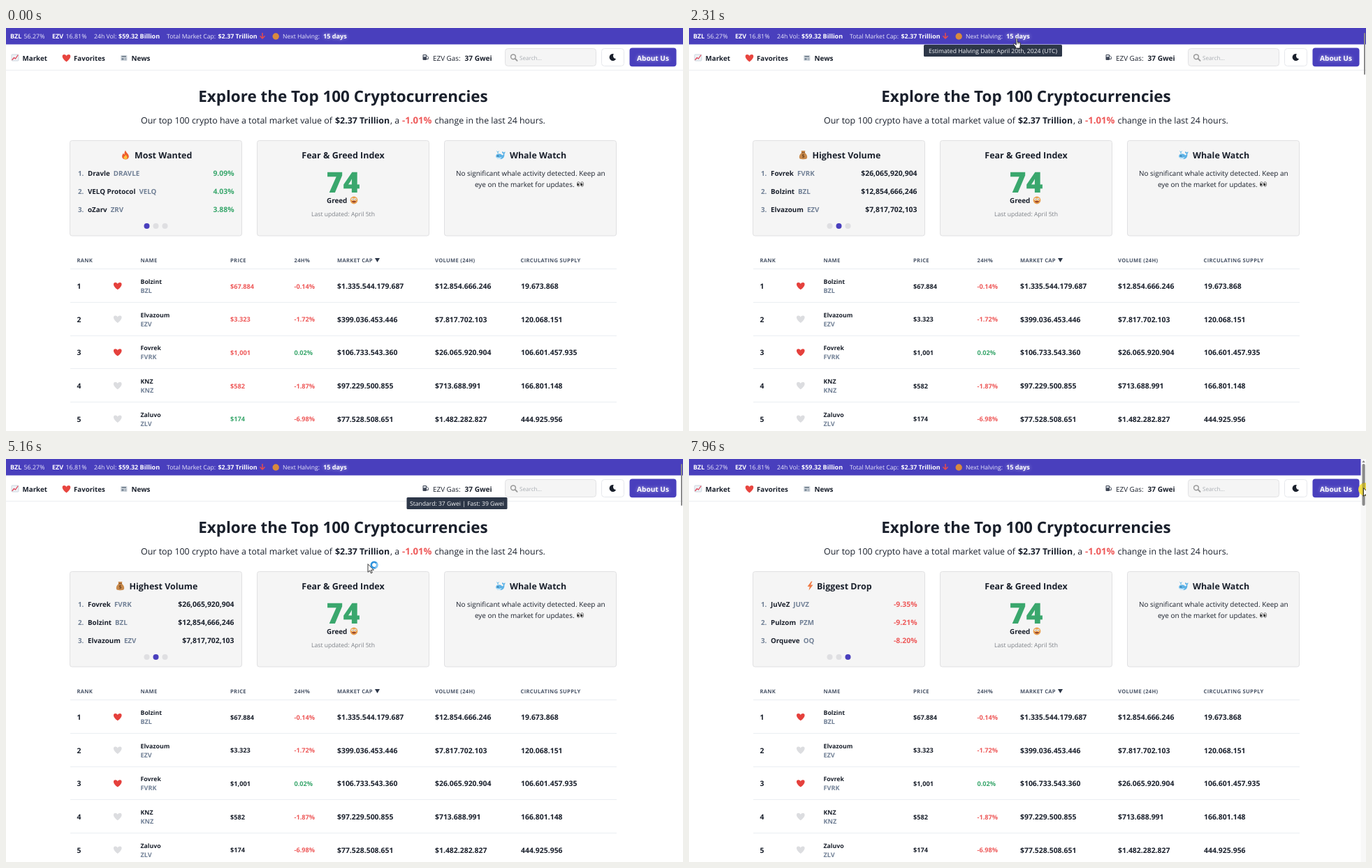
An HTML page for the animation above (8 s loop, 969 by 578 pixels).

```html
<!DOCTYPE html>
<html lang="en">
<head>
<meta charset="utf-8">
<title>Top 100 dashboard</title>
<style>
html, body { margin: 0; width: 100%; height: 100%; overflow: hidden; background: #fff; }
svg { display: block; width: 969px; height: 578px; }
text { font-family: "Open Sans", "Noto Sans", sans-serif; text-rendering: geometricPrecision; white-space: pre; }
.b { font-weight: 700; }
.x { font-weight: 800; }
.glow { text-shadow: 0 0 5px rgba(255, 255, 255, .6); }
</style>
</head>
<body>
<svg id="stage" viewBox="0 0 969 578"></svg>
<script>
const LOOP = 8000;
const INK = '#1a202c', SLATE = '#718096', RED = '#ee5a5a', GREEN = '#3aa76d', BRAND = '#493fbd';
const HEART = 'M0 5.4C-7.7 0-6.6-5-3.3-5-1.4-5 0-3.7 0-2.6 0-3.7 1.4-5 3.3-5 6.6-5 7.7 0 0 5.4Z';

const text = (x, y, size, str, fill = INK, cls = '', anchor = 'start') =>
  `<text x="${x}" y="${y}" font-size="${size}" fill="${fill}" class="${cls}" text-anchor="${anchor}">${str}</text>`;
const rect = (x, y, w, h, fill, r = 0, stroke = 'none') =>
  `<rect x="${x}" y="${y}" width="${w}" height="${h}" rx="${r}" fill="${fill}" stroke="${stroke}"/>`;
const dot = (x, y, r, fill) => `<circle cx="${x}" cy="${y}" r="${r}" fill="${fill}"/>`;
const path = (d, fill, stroke = 'none', w = 1) =>
  `<path d="${d}" fill="${fill}" stroke="${stroke}" stroke-width="${w}" stroke-linejoin="round" stroke-linecap="round"/>`;
const at = (x, y, body, id = '') => `<g ${id && `id="${id}"`} transform="translate(${x} ${y})">${body}</g>`;

const icon = {
  chart: rect(-5, -4.5, 10, 9, '#eef2f6', 1, '#ccd5de') + path('M-4 3L-1.5 0 .5 1.5 4-3.5', 'none', '#e0475b', 1.3),
  news: rect(-4.5, -4, 9.5, 8, '#d5dbe1', 1) + rect(-3, -3, 6.5, 1.6, '#697785') +
    rect(-3, 0, 3, 3, '#7d8b99') + rect(1, 0, 3, 1, '#8895a2') + rect(1, 2, 3, 1, '#8895a2'),
  pump: rect(-4, -4, 5.5, 8, '#3f4756', 1) + rect(-3, -3, 3.5, 2.4, '#dfe4ea') +
    path('M2-2L3.8-.5V2.5H2', 'none', '#3f4756', 1),
  fire: path('M0-6.5C1-3 5-1 4.8 2.4 4.6 5 2.5 6.5 0 6.5-3 6.5-5 4.5-4.8 1.8-4.7 0-3.8-1.2-3-2.4-2.6-1-2-.6-1.4-.6-1.8-3-1-5 0-6.5Z', '#ee5a2c') +
    path('M.4-.5C1 1.4 2.8 2 2.6 4 2.4 5.6 1.2 6.2 0 6.2-1.8 6.2-2.8 5-2.6 3.4-2.4 2 0 1.6.4-.5Z', '#fbc13c'),
  bag: path('M-2-3.5L-3-6H3L2-3.5C5-1 6 1.8 5.6 4 5.3 5.7 4 6.2 0 6.2S-5.3 5.7-5.6 4C-6 1.8-5-1-2-3.5Z', '#c98a4b') +
    rect(-2.6, -4, 5.2, 1.3, '#8d572c', .6) + text(0, 4.2, 7, '$', '#6c4220', 'b', 'middle'),
  bolt: path('M1.5-6.5L-4 1H-.8L-2 6.5 4-1.5H.6L3-6.5Z', '#ef7a45'),
  whale: path('M-6 0C-5-2.2 0-2.6 2.2-.5 3.6.5 4.4-.5 4.4-2.2 2.8-2.4 2.3-4 2.5-5.2 4-5 4.8-4.4 5-3.6 5.4-4.4 6.2-5 7-5 7-3.4 6.4-2.4 5.8-2.1 6.4 3 3.6 5.5-.6 5.5-4.4 5.5-7 3.6-6 0Z', '#5cb2e6') +
    path('M-6 2.5C-3 4 0 3.6 2 2.5 1 5-.6 5.4-2 5.4-4.4 5.2-5.8 4-6 2.5Z', '#d9effb') +
    path('M-3.5-2.6V-4.5M-3.5-4.5L-5-5.8M-3.5-4.5L-2-5.8', 'none', '#6fc0ec', 1) + dot(-3.4, 1, .7, '#1f3d54'),
  face: dot(0, 0, 5.4, '#e9a04f') + dot(-2, -1.5, 1.7, '#fff') + dot(2, -1.5, 1.7, '#fff') +
    dot(-1.8, -1.4, .7, '#443') + dot(2.1, -1.4, .7, '#443') + path('M-3 1.3H3C2.6 4-2.6 4-3 1.3Z', '#8c3b2c'),
  eyes: [-2.6, 2.6].map(x => `<ellipse cx="${x}" cy="0" rx="2" ry="3.4" fill="#fff" stroke="#555" stroke-width=".8"/>` +
    `<ellipse cx="${x - .5}" cy=".4" rx="1.1" ry="1.9" fill="#222"/>`).join(''),
  moon: path('M1.6-4.8A5 5 0 1 0 4.8 2.2 4.2 4.2 0 0 1 1.6-4.8Z', INK),
  lens: '<circle r="3.4" cx="-1" cy="-1" fill="none" stroke="#9a9a9a" stroke-width="1.5"/>' + path('M1.7 1.7L4.6 4.6', 'none', '#9a9a9a', 1.9)
};

function topBar() {
  const w = '#fff', soft = '#e9e7fb';
  return rect(0, 0, 969, 23.5, BRAND) +
    text(6, 15.4, 9, 'BZL', w, 'b') + text(25.5, 15.4, 8.9, '56.27%', soft) +
    text(66, 15.4, 9, 'EZV', w, 'b') + text(85.5, 15.4, 8.9, '16.81%', soft) +
    text(126, 15.4, 8.7, '24h Vol:', soft) + text(161, 15.4, 9, '$59.32 Billion', w, 'b') +
    text(230, 15.4, 8.65, 'Total Market Cap:', soft) + text(303.5, 15.4, 8.9, '$2.37 Trillion', w, 'b') +
    path('M367 7.5V15M363.8 11.8L367 15 370.2 11.8', 'none', '#e84c4c', 1.5) +
    dot(386.2, 12, 4.7, '#d98a3d') +
    text(396, 15.4, 8.6, 'Next Halving:', soft) + text(454, 15.4, 9.1, '15 days', w, 'b glow');
}

function nav() {
  return rect(0, 60, 969, 1, '#eceef1') +
    at(13, 42.5, icon.chart) + text(23.5, 46.5, 9.8, 'Market', INK, 'b') +
    at(86.5, 43, path(HEART, '#e8453f')) + text(97, 46.5, 9.7, 'Favorites', INK, 'b') +
    at(168.5, 43, icon.news) + text(179.5, 46.5, 9.9, 'News', INK, 'b') +
    at(600.5, 42, icon.pump) + text(611, 46.5, 9.9, 'EZV Gas:') + text(656.5, 46.5, 10.1, '37 Gwei', INK, 'b') +
    rect(714.5, 29.5, 130, 25, '#f5f5f5', 4, '#e2e2e4') + at(727, 42.3, icon.lens) +
    text(735, 45.5, 8.1, 'Search...', '#a9adb3') +
    rect(852.5, 29.5, 32, 25, '#fff', 4, '#e6e8ec') + at(868.3, 42, icon.moon) +
    rect(892.5, 28.6, 67, 26.6, BRAND, 4) + text(926, 46.5, 10.1, 'About Us', '#fff', 'b glow', 'middle');
}

function hero() {
  return text(482.5, 106.3, 22.45, 'Explore the Top 100 Cryptocurrencies', INK, 'b', 'middle') +
    text(193, 136.5, 12.45, 'Our top 100 crypto have a total market value of') +
    text(471, 136.5, 12.4, '$2.37 Trillion', INK, 'b') + text(550, 136.5, 12.4, ', a') +
    text(567, 136.5, 13.2, '-1.01%', RED, 'b') + text(613.5, 136.5, 12.35, 'change in the last 24 hours.');
}

// Each slide: title, icon, icon x, title x, value colour, rows
const slides = [
  ['Most Wanted', 'fire', 171, 184, GREEN,
    [['Dravle', 'DRAVLE', '9.09%'], ['VELQ Protocol', 'VELQ', '4.03%'], ['oZarv', 'ZRV', '3.88%']]],
  ['Highest Volume', 'bag', 163.5, 176.5, INK,
    [['Fovrek', 'FVRK', '$26,065,920,904'], ['Bolzint', 'BZL', '$12,854,666,246'], ['Elvazoum', 'EZV', '$7,817,702,103']]],
  ['Biggest Drop', 'bolt', 173.5, 183, RED,
    [['JuVeZ', 'JUVZ', '-9.35%'], ['Pulzom', 'PZM', '-9.21%'], ['Orqueve', 'OQ', '-8.20%']]]
];

function slide([title, pic, ix, tx, color, rows], i) {
  return `<g id="slide${i}">` + at(ix, 182, icon[pic]) + text(tx, 186.6, 12.45, title, INK, 'b') +
    rows.map(([name, code, val], k) => {
      const y = 212 + 26 * k;
      return text(103, y, 9.8, `${k + 1}.`, SLATE, 'b') +
        text(117, y, 9.8, `${name}<tspan dx="5" fill="${SLATE}">${code}</tspan>`, INK, 'b') +
        text(326.5, y, 10.4, val, color, 'b', 'end');
    }).join('') + '</g>';
}

function cards() {
  return [91.5, 359.5, 627.5].map(x => rect(x, 161.5, 246, 136.5, '#f5f5f5', 3, '#e0e0e2')).join('') +
    slides.map(slide).join('') +
    [0, 1, 2].map(i => `<circle id="dot${i}" cx="${201.5 + 13 * i}" cy="284" r="4"/>`).join('') +
    text(482.5, 186.6, 12.5, 'Fear &amp; Greed Index', INK, 'b', 'middle') +
    text(482.5, 236, 41, '74', GREEN, 'x', 'middle') +
    text(459, 251, 9.9, 'Greed', INK, 'b') + at(498, 247, icon.face) +
    text(482.5, 270, 8.6, 'Last updated: April 5th', '#7c8087', '', 'middle') +
    at(707.5, 182.5, icon.whale) + text(721, 186.6, 12.4, 'Whale Watch', INK, 'b') +
    text(750.8, 212, 9.94, 'No significant whale activity detected. Keep an', INK, '', 'middle') +
    text(671, 227.5, 9.94, 'eye on the market for updates.') + at(822, 224, icon.eyes);
}

const coins = [
  ['Bolzint', 'BZL', '$67.884', '-0.14%', '$1.335.544.179.687', '$12.854.666.246', '19.673.868'],
  ['Elvazoum', 'EZV', '$3.323', '-1.72%', '$399.036.453.446', '$7.817.702.103', '120.068.151'],
  ['Fovrek', 'FVRK', '$1,001', '0.02%', '$106.733.543.360', '$26.065.920.904', '106.601.457.935'],
  ['KNZ', 'KNZ', '$582', '-1.87%', '$97.229.500.855', '$713.688.991', '166.801.148'],
  ['Zaluvo', 'ZLV', '$174', '-6.98%', '$77.528.508.651', '$1.482.282.827', '444.925.956']
];

function table() {
  const heads = [[101.5, 'RANK'], [192.5, 'NAME'], [321, 'PRICE'], [412.5, '24H%'],
    [474, 'MARKET CAP'], [614, 'VOLUME (24H)'], [736.5, 'CIRCULATING SUPPLY']];
  return `<g letter-spacing=".3">` + heads.map(([x, s]) => text(x, 335.6, 7.6, s, '#4a5568', 'b')).join('') + '</g>' +
    path('M528 330H535L531.5 336Z', '#2d3748') +
    coins.map(([name, code, price, change, cap, vol, supply], i) => {
      const y = 370.3 + 47.65 * i;
      return rect(92, Math.round(y - 25), 782, 1, '#eaeef2') +
        text(101.5, y + 3.8, 10.4, i + 1, INK, 'b') +
        at(159.8, y - .4, path(HEART, i % 2 || i > 2 ? '#dcdde0' : '#e5403c')) +
        text(192.5, y - 3.3, 8.75, name, INK, 'b') + text(192.5, y + 9.8, 9.1, code, SLATE, 'b') +
        `<g class="price" data-flash="${i === 4 ? GREEN : RED}">` + text(321, y + 3.3, 9.2, price, INK, 'b') + '</g>' +
        text(412.5, y + 3.3, 9.2, change, change[0] === '-' ? RED : GREEN, 'b') +
        text(474, y + 3.8, 10.45, cap, INK, 'b') + text(614, y + 3.8, 10.45, vol, INK, 'b') +
        text(737, y + 3.8, 10.45, supply, INK, 'b');
    }).join('');
}

const tip = (id, w, str) =>
  `<g id="${id}">` + rect(-w / 2, 0, w, 17, '#2d3748', 1.5) + text(0, 11.5, 8.6, str, '#f3f4f6', '', 'middle') + '</g>';

function overlay() {
  const arrow = path('M0 0V11.3L2.7 8.9 4.4 12.8 6.2 12 4.5 8.2H8Z', '#fff', '#222', .9);
  const hand = path('M-1 1C-1-.4 1-.4 1 1V5.2L4 5.7C5.4 6 5.8 6.8 5.6 8L4.8 11.5V14H-1.4V12.3L-4.4 8.6C-5 7.5-3.8 6.7-2.8 7.5L-1 9Z', '#fff', '#222', .9) +
    path('M1 5.5V7.6M2.7 5.8V7.7M4.2 6.2V8', 'none', '#444', .7);
  const ring = '<circle r="4.2" fill="none" stroke="#2f93dd" stroke-width="2.6"/>' +
    path('M0-4.2A4.2 4.2 0 0 1 4.2 0', 'none', '#8ccbf5', 2);
  return tip('halvingTip', 198, 'Estimated Halving Date: April 20th, 2024 (UTC)') +
    tip('gasTip', 144, 'Standard: 37 Gwei | Fast: 39 Gwei') +
    `<g id="thinBar">${rect(966, 7, 2, 60, '#8a8a8a', 1)}</g>` +
    `<g id="wideBar">${rect(961.5, 0, 7.5, 578, '#f8f8f8')}${path('M963.3 5L965.5 2 967.7 5Z', '#858585')}${rect(963.5, 7, 4.2, 60, '#8a8a8a', 2)}</g>` +
    `<g id="click">${dot(967.3, 43.5, 9.3, '#f5e04a')}${rect(963.5, 34, 4.2, 19, 'rgba(120,110,40,.5)')}</g>` +
    `<g id="cursor"><g id="arrow">${arrow}</g><g id="hand">${hand}</g>${at(9, 1, `<g id="spin">${ring}</g>`, 'ring')}</g>`;
}

const stage = document.getElementById('stage');
stage.innerHTML = rect(0, 0, 969, 578, '#fff') + topBar() + nav() + hero() + cards() + table() + overlay();

const $ = id => document.getElementById(id);
const prices = [...document.querySelectorAll('.price')];
const clamp = v => Math.min(1, Math.max(0, v));
const show = (id, on) => $(id).setAttribute('visibility', on ? 'visible' : 'hidden');

// Pointer track: time, x, y
const track = [
  [1140, 640, 562], [1450, 560, 250], [1830, 485.5, 28], [2000, 469, 15], [3360, 469, 15],
  [3500, 560, 40], [3640, 627.5, 47], [3900, 660, 45], [4130, 671, 41], [4200, 679, 41],
  [4880, 679, 41], [5160, 518.5, 151], [5500, 350, 157], [5640, 312.5, 152], [5990, 312.5, 152],
  [6250, 170, 146], [6490, 380, 132], [6900, 891.5, 96], [7310, 949, 30], [7590, 965.5, 42], [8000, 965.5, 42]
];

function pointer(t) {
  const i = Math.max(1, track.findIndex(k => k[0] >= t));
  const [t0, x0, y0] = track[i - 1], [t1, x1, y1] = track[i];
  const p = clamp((t - t0) / (t1 - t0));
  return [x0 + (x1 - x0) * p, y0 + (y1 - y0) * p];
}

function popTip(id, cx, y, t, open, close) {
  const p = clamp((t - open) / 160), q = clamp((t - close) / 275);
  const scale = (.85 + .15 * p) * (1 - .16 * clamp(2 * q));
  $(id).setAttribute('transform', `translate(${cx} ${y}) scale(${scale})`);
  $(id).setAttribute('opacity', p * (1 - q ** 3));
}

function draw(t) {
  const a = clamp((t - 1500) / 700), b = clamp((t - 6760) / 700);
  [1 - a, a * (1 - b), b].forEach((o, i) => $('slide' + i).setAttribute('opacity', o));
  const active = (a > 0) + (b > 0);
  for (let i = 0; i < 3; i++) $('dot' + i).setAttribute('fill', i === active ? BRAND : '#dfdfe2');
  prices.forEach(g => g.firstChild.setAttribute('fill', t < 480 ? g.dataset.flash : INK));

  popTip('halvingTip', 435, 24, t, 2100, 3370);
  popTip('gasTip', 645.5, 55, t, 3950, 5850);

  const wide = t >= 7520, hand = t >= 1970 && t < 4880;
  show('thinBar', t >= 1140 && !wide);
  show('wideBar', wide);
  show('click', t >= 7960);
  show('arrow', t >= 1140 && !hand);
  show('hand', hand);
  show('ring', t >= 1140 && !hand && !wide);
  $('cursor').setAttribute('transform', `translate(${pointer(t)})`);
  $('spin').setAttribute('transform', `rotate(${t * .36})`);
}

const start = performance.now();
function tick() {
  draw((performance.now() - start) % LOOP);
  requestAnimationFrame(tick);
}
tick();
</script>
</body>
</html>
```
